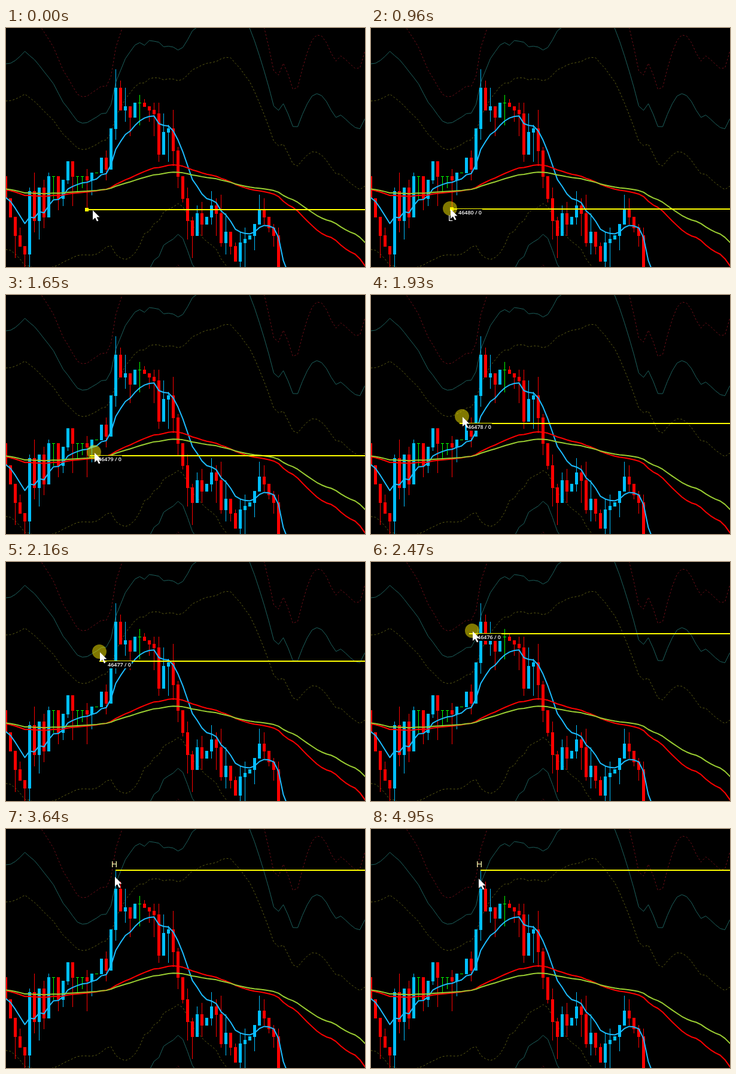
An HTML page with a canvas for the animation above (5.68 s loop, 600 by 400 pixels).

```html
<!DOCTYPE html>
<html lang="en">
<head>
<meta charset="utf-8">
<title>Snapping price line</title>
<style>
html, body { margin: 0; width: 100%; height: 100%; overflow: hidden; background: #000; }
canvas { display: block; }
</style>
</head>
<body>
<canvas id="stage" width="600" height="400"></canvas>
<script>
const LOOP = 5680, PRESS = 960, RELEASE = 3590, SNAP = 3640, NUDGE = 4950, LAG = 50;
const LAST_CANDLE = 57, LAST_BAR = 76, WINDOW = 25;
const LOW = { bar: 17, tick: 33 }, HIGH = { bar: 23, tick: -5 };
const YELLOW = '#ff0';

const ctx = document.getElementById('stage').getContext('2d');
const chart = document.createElement('canvas');
chart.width = 600;
chart.height = 400;
const pen = chart.getContext('2d');

// Turning points of the closing price: bar, ticks below the highest close
const turns = [[-24,33], [-21,33], [-20,14], [-13,12], [-10,16], [-5,40], [-3,40], [-2,25], [-1,24],
  [0,30], [2,40], [4,45], [5,28], [6,36], [7,27], [8,35], [9,24], [10,24], [11,30], [13,20], [14,24],
  [16,24], [17,25], [18,23], [19,23], [20,19], [21,22], [23,0], [24,6], [25,5], [26,8], [27,4], [28,4],
  [31,7], [32,18], [33,12], [34,11], [38,36], [39,40], [40,34], [41,37], [43,32], [44,34], [45,42],
  [46,39], [48,47], [49,42], [51,40], [53,33], [56,40], [57,51],
  [58,72], [60,54], [62,78], [65,77], [68,54], [70,82], [73,65], [75,106]];

// Pointer path while dragging: time, x, y
const path = [[960,133,303], [1120,133,303], [1270,139,294], [1520,145,278], [1650,148,264],
  [2110,156,166], [2160,157,151], [2400,167,122], [2720,179,96], [2900,182,88], [3180,182,80]];

// Linear interpolation between keys of the form [position, ...values]
function sample(keys, at) {
  const next = keys.findIndex(key => key[0] > at);
  if (next < 0) return keys[keys.length - 1].slice(1);
  const a = keys[next - 1], b = keys[next], k = (at - a[0]) / (b[0] - a[0]);
  return a.slice(1).map((v, j) => Math.round(v + (b[j + 1] - v) * k));
}

const close = bar => sample(turns, bar)[0];
const barX = bar => 8 * bar - 1;
const tickY = tick => 100 + 6.17 * tick;
const bars = Array.from({ length: LAST_BAR + 1 }, (_, bar) => bar);

let seed = 77;
const random = () => (seed = seed * 16807 % 2147483647) / 2147483647;

function average(period, start) {
  let value = start;
  return bars.map(bar => bar ? value += (close(bar) - value) * 2 / (period + 1) : value);
}

function spread(bar) {
  const recent = Array.from({ length: WINDOW }, (_, k) => close(bar - k));
  const mean = recent.reduce((sum, c) => sum + c) / WINDOW;
  const variance = recent.reduce((sum, c) => sum + (c - mean) ** 2, 0) / WINDOW;
  return { mean, deviation: Math.sqrt(variance) };
}

function drawCandle(bar) {
  const o = close(bar - 1), c = close(bar), x = barX(bar);
  const top = Math.min(o, c), bottom = Math.max(o, c);
  const high = bar === HIGH.bar ? HIGH.tick : top - Math.floor(6 * random() ** 2);
  const low = bar === LOW.bar ? LOW.tick : bottom + Math.floor(9 * random() ** 2);
  const bar1px = (left, width, from, to) => {
    const y = Math.round(tickY(from));
    pen.fillRect(left, y, width, Math.round(tickY(to)) - y + 1);
  };
  pen.fillStyle = c < o ? '#00bfff' : c > o ? '#f00' : '#0f0';
  bar1px(x, 1, high, low);
  bar1px(x - 2, 5, top, bottom);
}

function curve(ticks, color, width, dash = []) {
  pen.strokeStyle = color;
  pen.lineWidth = width;
  pen.lineJoin = 'round';
  pen.setLineDash(dash);
  pen.beginPath();
  ticks.forEach((tick, bar) => pen.lineTo(barX(bar) + .5, tickY(tick) + .5));
  pen.stroke();
}

function drawChart() {
  pen.fillStyle = '#000';
  pen.fillRect(0, 0, 600, 400);

  const spreads = bars.map(spread);
  const band = (factor, color, dash) => [-factor, factor].forEach(f =>
    curve(spreads.map(s => s.mean + f * s.deviation), color, 1, dash));
  band(4, '#6c0f18', [3, 3]);
  band(2, '#5c5c14', [3, 3]);
  band(3, '#1d625e');

  bars.slice(0, LAST_CANDLE + 1).forEach(drawCandle);
  curve(average(9, 29.7), '#1cbcff', 2);
  curve(average(65, 27.6), '#f00', 2);
  curve(average(100, 27.4), '#9acd32', 2);
}

function pointer(t) {
  if (t < PRESS) return [145, 305];
  return t < NUDGE ? sample(path, t) : [180, 83];
}

// The line trails the pointer and jumps from bar to bar
function lineState(t) {
  if (t < PRESS) return [LOW.bar, Math.round(tickY(LOW.tick))];
  if (t >= SNAP) return [HIGH.bar, Math.round(tickY(HIGH.tick))];
  const [x, y] = pointer(Math.max(PRESS, t - LAG));
  return [Math.round(x / 8), y];
}

function write(text, x, y, font, color, align) {
  ctx.font = font;
  ctx.fillStyle = color;
  ctx.textAlign = align;
  ctx.fillText(text, x, y);
}

function drawArrow(x, y) {
  const points = [[0,0], [0,16], [4,12.5], [7,18.5], [9.5,17.5], [6.5,11.5], [11.5,11.5]];
  ctx.fillStyle = '#fff';
  ctx.beginPath();
  points.forEach(([dx, dy]) => ctx.lineTo(x + dx, y + dy));
  ctx.fill();
}

function draw(now) {
  const t = now % LOOP;
  const dragging = t >= PRESS && t < SNAP;
  const [px, py] = pointer(t), [bar, y] = lineState(t), x = barX(bar);
  const atLow = bar === LOW.bar, atHigh = bar === HIGH.bar;

  ctx.drawImage(chart, 0, 0);
  ctx.fillStyle = YELLOW;
  ctx.fillRect(x, y - 1, 600 - x, 2);
  if (t < SNAP) {
    const size = atLow || atHigh ? 6 : 2;
    ctx.fillRect(x - 3, y - size / 2, 6, size);
  }
  if (dragging) {
    ctx.fillStyle = '#000';
    ctx.fillRect(x + 9, y, 42, 12);
    write(46497 - bar + ' / 0', x + 11, y + 9, '600 9px "Open Sans", sans-serif', '#fff', 'left');
  }
  const letter = '14px "Liberation Sans", Arial, sans-serif';
  if (dragging && atLow) write('L', x - 2, 323, letter, '#fff', 'center');
  if (atHigh) write('H', x - 2, 64, letter, '#ffffb4', 'center');
  if (t >= PRESS && t < RELEASE) {
    ctx.fillStyle = 'rgba(255, 240, 0, .5)';
    ctx.beginPath();
    ctx.arc(px - 1, py - 1, 12, 0, 2 * Math.PI);
    ctx.fill();
  }
  drawArrow(px, py);
  requestAnimationFrame(() => draw(performance.now()));
}

drawChart();
draw(performance.now());
</script>
</body>
</html>
```
